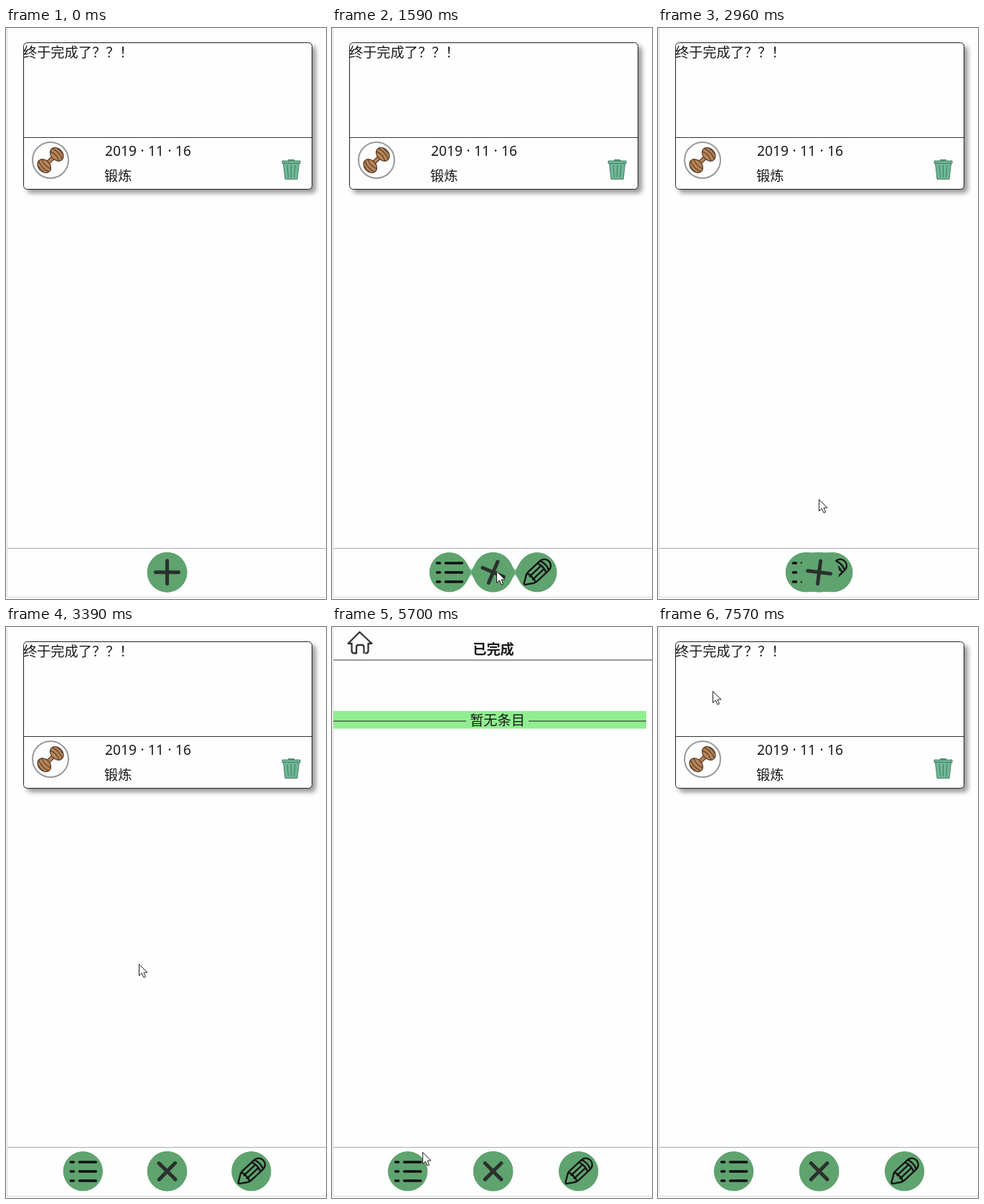
These frames come from a looping animation (446x795 px, 7600 ms). An HTML page:

```html
<!DOCTYPE html>
<html lang="zh-CN">
<head>
<meta charset="utf-8">
<title>Plan list</title>
<style>
  html, body { margin: 0; width: 100%; height: 100%; overflow: hidden; background: #fefefe; }
  svg { display: block; width: 446px; height: 795px; }
  text { font: 19.2px "Noto Sans", "Noto Sans CJK SC", "Noto Sans CJK", sans-serif; fill: #1a1a1a; }
  .mid { text-anchor: middle; }
  .bold { font-weight: 700; }
  .date { word-spacing: .5px; }
  .line { fill: none; stroke-linecap: round; stroke-linejoin: round; }
  .card { fill: #fefefe; filter: drop-shadow(5px 5px 3px #999); }
  .ring { fill: #fefefe; stroke: #999; stroke-width: 2; }
  .disc { fill: #5fa36f; }
</style>
</head>
<body>
<svg viewBox="0 0 446 795">
  <defs>
    <filter id="goo" filterUnits="userSpaceOnUse" x="50" y="700" width="350" height="95" color-interpolation-filters="sRGB">
      <feGaussianBlur stdDeviation="5.5"/>
      <feColorMatrix values="1 0 0 0 0  0 1 0 0 0  0 0 1 0 0  0 0 0 18 -7"/>
    </filter>
    <g id="weight">
      <ellipse cx="12" rx="8" ry="10.500"/>
      <path d="M8-9Q12 0 8 9M13-10Q17 0 13 10M18-5Q20 0 18 5" fill="none"/>
    </g>
  </defs>
  <path d="M1.500 0V792.500H446" fill="none" stroke="#d8d8d8"/>

  <g id="home">
    <rect class="card" x="24.500" y="20.500" width="402" height="204" rx="5" stroke="#222"/>
    <path d="M25 152.500H426" stroke="#333"/>
    <text x="24" y="41">终于完成了？？！</text>
    <text class="date" x="138" y="178">2019 · 11 · 16</text>
    <text x="137" y="213">锻炼</text>
    <circle class="ring" cx="62" cy="184" r="25"/>
    <g transform="translate(62 184) rotate(-43)" fill="#b98556" stroke="#5b4030" stroke-width="1.300">
      <rect x="-7" y="-2.500" width="14" height="5"/>
      <use href="#weight"/>
      <use href="#weight" transform="scale(-1 1)"/>
    </g>
    <g fill="#6fb896" stroke="#467a68">
      <path d="M386.500 188.500H408.500L406 210.500H389Z"/>
      <path d="M385 185H410V188.500H385ZM393.500 185V183.500H401.500V185"/>
      <path d="M392 191L393.500 208M397.500 191V208M403 191L401.500 208" fill="none"/>
    </g>
  </g>

  <g id="head">
    <path d="M2 46H446" stroke="#777" stroke-width="1.500"/>
    <path class="line" d="M27.500 23H22.500L38.500 7L55.500 23H50.500V33Q50.500 36.500 47 36.500M27.500 23V33Q27.500 36.500 31 36.500H34V28Q34 25 37 25H41.500Q44.500 25 44.500 28V36" stroke="#333" stroke-width="2.300"/>
    <text id="title" class="mid bold" x="225" y="37.500"></text>
  </g>

  <g id="plan">
    <rect class="card" x="26.500" y="70.500" width="397" height="409" rx="5" stroke="#999"/>
    <text class="mid" x="225" y="111">New Plan</text>
    <rect x="53.500" y="135.500" width="342" height="124" rx="4" fill="none" stroke="#333"/>
    <text x="56" y="158" style="fill:#777">新建事项...</text>
    <path d="M77 293.500H158.500M291 293.500H372.500" stroke="#222"/>
    <text class="mid date" x="225" y="299">2019 · 11 · 27</text>
    <circle class="ring" cx="154.500" cy="348.500" r="25"/>
    <g stroke="#333" stroke-width="1.300">
      <path d="M141 333Q141 329 145 329H167V336H169V369H141Z" fill="#fff"/>
      <path d="M143 336H148V368H143Z" fill="#d9c6ea" stroke="none"/>
      <path d="M149 339H169V369H149Z" fill="#30c5fa" stroke="none"/>
      <path d="M141 336H168M146 332.500H166M147.500 336V369" fill="none"/>
    </g>
    <rect x="225.500" y="323.500" width="94" height="46" rx="3" fill="#fefefe" stroke="#333"/>
    <text x="231.500" y="353" style="font-size:16px">学习</text>
    <path d="M304.500 343.500H312.500L308.500 350.500Z" fill="#111"/>
    <rect x="125.500" y="404" width="198.500" height="52" rx="2" fill="#07c160"/>
    <text class="mid" x="225" y="437" style="font-size:17.300px;fill:#fff">添加</text>
  </g>

  <g id="done">
    <rect x="2" y="117" width="436" height="24.500" fill="#90ee90"/>
    <path d="M2 131H187M274 131H438" stroke="#222"/>
    <text class="mid" x="230.500" y="136.500">暂无条目</text>
  </g>

  <path d="M2 724.500H446" stroke="#aaa"/>
  <g class="disc" filter="url(#goo)">
    <circle id="dotL" cy="757.800" r="27"/>
    <circle cx="224.600" cy="757.800" r="27"/>
    <circle id="dotR" cy="757.800" r="27"/>
  </g>
  <path id="list" class="line" d="M-17-13H-13M-5-13H18M-17 0H-13M-5 0H18M-17 13H-13M-5 13H18" stroke="#111" stroke-width="3.600"/>
  <g id="pen">
    <path class="line" transform="rotate(-43)" d="M-24-1L-13-8Q-11-9-9-9H13C26-9 26 9 13 9H-9Q-11 9-13 8L-24 1ZM-12-8Q-8-5-11-3Q-8 0-11 3Q-8 5-12 8M-10-3H9M-10 3H9M9-9Q13 0 9 9M14-9Q18 0 14 9" stroke="#151515" stroke-width="2.400"/>
  </g>
  <circle class="disc" cx="224.600" cy="757.800" r="27.800"/>
  <path id="plus" class="line" d="M-16 0H16M0-16V16" stroke="#2b302d" stroke-width="5"/>
  <path id="cursor" d="M.5.5V16.500L4.300 13L7 19L9.500 18L7 12H12Z" fill="#fff" stroke="#222"/>
</svg>
<script>
const $ = id => document.getElementById(id);
const LOOP = 7600, MID = 224.6, SPREAD = 119, SLIDE = 650;
const PLAN = 4000, DONE = 5260, HOME = 7270;

// Pointer strokes: start, end, where to, sideways bend
const strokes = [
  [170, 740, 229, 756, 0, -36],
  [2910, 3250, 174, 266, 10, 0],
  [3250, 3700, 356, 763, -66, 0],
  [4440, 5040, 116, 762, 0, 14],
  [5400, 5700, 125, 733, 0, 10],
  [5700, 6050, 262, 155, 0, 0],
  [6050, 6830, 40, 32, 0, 0],
  [HOME, 7570, 76, 89, 0, 0]
];

const clamp = k => Math.min(1, Math.max(0, k));
const easeOut = k => 1 - (1 - k) ** 1.4;
const easeInOut = k => (1 - Math.cos(Math.PI * k)) / 2;
const slide = (t, start) => easeInOut(clamp((t - start) / SLIDE));

function pointer(t) {
  let x = 376, y = 790;
  for (const [start, end, toX, toY, bendX, bendY] of strokes) {
    const k = easeOut(clamp((t - start) / (end - start)));
    const bow = Math.sin(Math.PI * k);
    x += (toX - x) * k + bendX * bow;
    y += (toY - y) * k + bendY * bow;
  }
  return [Math.round(x), Math.round(y)];
}

const place = (id, x, y, turn = 0) =>
  $(id).setAttribute('transform', `translate(${x} ${y}) rotate(${turn})`);
const show = (id, on) => { $(id).style.display = on ? '' : 'none'; };

function draw(t) {
  const page = t < PLAN || t >= HOME ? 'home' : t < DONE ? 'plan' : 'done';
  for (const id of ['home', 'plan', 'done']) show(id, id === page);
  show('head', page !== 'home');
  $('title').textContent = page === 'plan' ? '新事件' : '已完成';

  // The menu opens, closes and opens again
  const open = slide(t, 1260) - slide(t, 2110) + slide(t, 2790);
  const left = MID - SPREAD * open, right = MID + SPREAD * open;
  $('dotL').setAttribute('cx', left);
  $('dotR').setAttribute('cx', right);
  show('list', open > 0);
  show('pen', open > 0);
  place('list', left, 758);
  place('pen', right, 758);
  place('plus', MID, 757.8, 45 * open);

  show('cursor', t >= 170);
  place('cursor', ...pointer(t));
}

function tick() {
  draw(performance.now() % LOOP);
  requestAnimationFrame(tick);
}
tick();
</script>
</body>
</html>
```
